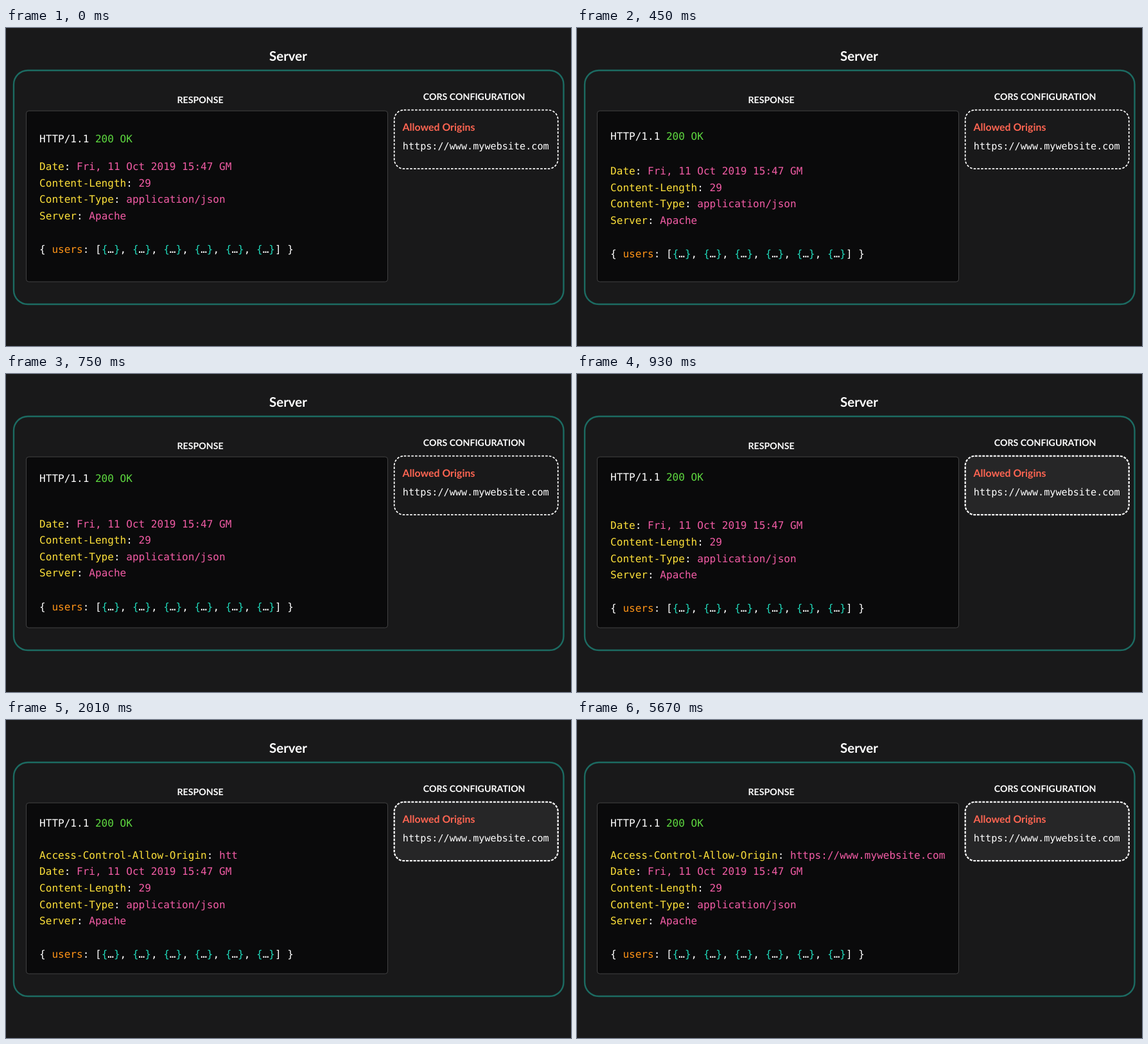
An HTML page for the animation above (5.7 s loop, 880 by 495 pixels).

```html
<!DOCTYPE html>
<html lang="en">
<head>
<meta charset="utf-8">
<title>CORS response</title>
<style>
  html, body { margin: 0; width: 100%; height: 100%; overflow: hidden; background: #19191a; }
  svg { display: block; width: 100%; height: 100%; }
  text { white-space: pre; fill: #fff; text-rendering: geometricPrecision; }
  .title { font: 700 14.2px Lato, sans-serif; text-anchor: middle; }
  .code { font: 16.04px "DejaVu Sans Mono", monospace; }
  .key { fill: #fde03a; }
  .val { fill: #f25ca5; }
  .ok { fill: #5fda40; }
  .prop { fill: #ff9417; }
  .obj { fill: #20d7b9; }
</style>
</head>
<body>
<svg viewBox="0 0 880 495">
  <rect width="880" height="495" fill="#19191a"/>
  <rect x="12" y="66" width="856.5" height="364" rx="22" fill="none" stroke="#1c6b62" stroke-width="2.4"/>
  <rect x="31.5" y="129" width="563" height="266" rx="4" fill="#0a0a0b" stroke="#424243"/>
  <rect id="config" x="604.7" y="127.7" width="255" height="91.5" rx="15" stroke="#fff"/>

  <text class="title" x="439.5" y="51.3" style="font-size:20.5px">Server</text>
  <text class="title" x="302.5" y="116.7">RESPONSE</text>
  <text class="title" x="729.2" y="112.4">CORS CONFIGURATION</text>
  <text class="title" x="617.5" y="159.8" style="font-size:15.9px;text-anchor:start;fill:#ff6552">Allowed Origins</text>
  <text class="code" x="617.8" y="189.2" style="font-size:15.15px">https://www.mywebsite.com</text>

  <g id="status"></g>
  <g id="typed"></g>
  <g id="rest"></g>
</svg>
<script>
const LOOP = 5700, TICK = 30;
const MOVE_START = 130, MOVE_TIME = 810, HIGHLIGHT = 930, TYPE_START = 1050;
const NS = 'http://www.w3.org/2000/svg';
const $ = id => document.getElementById(id);

function add(parent, tag, attrs) {
  const el = parent.appendChild(document.createElementNS(NS, tag));
  for (const name in attrs) el.setAttribute(name, attrs[name]);
  return el;
}

// Parts are [class, text] pairs set one after another.
function line(id, y, parts) {
  const text = add($(id), 'text', { class: 'code', x: 52.1, y });
  return parts.map(([cls, str]) => {
    const span = add(text, 'tspan', { class: cls });
    span.textContent = str;
    return { span, str };
  });
}

const header = (key, val) => [['key', key], ['', ': '], ['val', val]];

line('status', 166.2, [['', 'HTTP/1.1 '], ['ok', '200 OK']]);
const typed = line('typed', 215.8, header('Access-Control-Allow-Origin', 'https://www.mywebsite.com'));
[
  ['Date', 'Fri, 11 Oct 2019 15:47 GM'],
  ['Content-Length', '29'],
  ['Content-Type', 'application/json'],
  ['Server', 'Apache']
].forEach(([key, val], i) => line('rest', 241.4 + i * 25.65, header(key, val)));

const users = [['', '{ '], ['prop', 'users'], ['', ': [']];
for (let i = 0; i < 6; i++) {
  users.push(['obj', '{'], ['', '…'], ['obj', '}'], ['', i < 5 ? ', ' : '] }']);
}
line('rest', 370.4, users);

const clamp = u => Math.min(1, Math.max(0, u));
const ease = u => u * u * (3 - 2 * u);
const shift = (id, y) => $(id).setAttribute('transform', `translate(0 ${y.toFixed(2)})`);

function render(t) {
  const on = t >= HIGHLIGHT;
  const left = on ? 0 : 1 - ease(clamp((t - MOVE_START) / MOVE_TIME));
  shift('status', 12.2 * left);
  shift('rest', -20.5 * left);

  const box = $('config');
  box.setAttribute('fill', on ? '#262627' : 'none');
  box.setAttribute('stroke-width', on ? 2.2 : 1.7);
  box.setAttribute('stroke-dasharray', on ? '4 1.8' : '3.6 2.2');

  let count = Math.max(0, Math.floor((t - TYPE_START) / TICK));
  for (const { span, str } of typed) {
    span.textContent = str.slice(0, count);
    count = Math.max(0, count - str.length);
  }
}

const start = performance.now();
function loop() {
  const t = (performance.now() - start) % LOOP;
  render(Math.floor(t / TICK) * TICK);
  requestAnimationFrame(loop);
}
loop();
</script>
</body>
</html>
```
